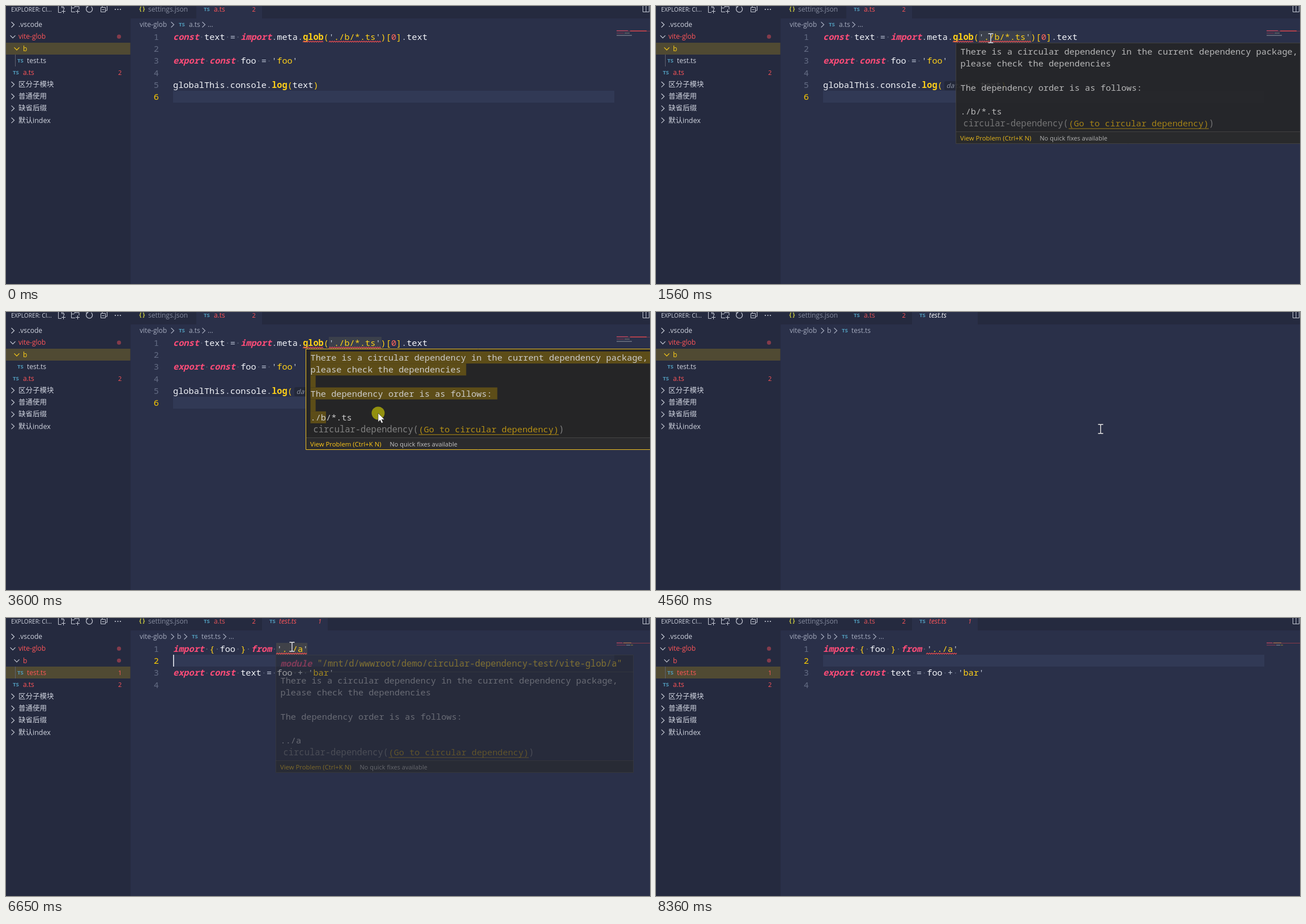
These frames come from a looping animation (1137x492 px, 8430 ms). An HTML page with a canvas:

```html
<!DOCTYPE html>
<html lang="en">
<head>
<meta charset="utf-8">
<title>Circular dependency hints</title>
<style>
html, body { margin: 0; width: 100%; height: 100%; overflow: hidden; background: #2a3049; }
canvas { display: block; }
</style>
</head>
<body>
<canvas id="stage" width="1137" height="492"></canvas>
<script>
const ctx = document.getElementById('stage').getContext('2d');
const LOOP = 8430, ROW = 21.17, CELL = 9.165, CODE_X = 295;
const MONO = '"Noto Sans Mono", monospace';
const TEXT_SIZE = 15.27, SNIPPET_SIZE = 15.47;
const SANS = '"Open Sans", "Noto Sans CJK SC", "Noto Sans CJK", sans-serif';
const RED = '#ff5558', YELLOW = '#ffd018', GREY = '#a4aabd', LIGHT = '#d0d4df';

// Moments of the hard changes, in ms.
const T = { hint: 600, hover1: 1490, focus: 2990, press: 3060, clear: 3670, open: 4400,
  reveal: 4650, content: 4780, errors: 5130, caret: 5640, hover2: 6650, leave2: 7480 };

const STYLES = {
  k: ['italic bold ', '#ff4c78'], w: ['', '#f4f6fb'], p: ['', '#c3cbdc'],
  y: ['', YELLOW], b: ['bold ', YELLOW], r: ['', '#ff6659']
};

const MOUSE = [[190, 1085, 500], [330, 1010, 400], [560, 820, 230], [800, 660, 110], [1020, 593, 65],
  [1160, 591, 57], [2090, 591, 57], [2500, 625, 130], [2910, 650, 192], [3060, 566, 187],
  [3350, 537, 74], [3560, 657, 179], [3740, 657, 179], [4150, 785, 207], [4780, 785, 207],
  [5200, 680, 130], [5570, 580, 71], [5710, 573, 68], [6320, 505, 51], [7130, 505, 51],
  [7340, 858.5, 282], [7600, 1010, 390], [7890, 1119, 502]];

function mouseAt(t) {
  const i = MOUSE.findIndex(p => p[0] > t);
  if (i < 1) return null;
  const [t0, x0, y0] = MOUSE[i - 1], [t1, x1, y1] = MOUSE[i];
  const u = (t - t0) / (t1 - t0);
  return [x0 + (x1 - x0) * u, y0 + (y1 - y0) * u];
}

function rect(x, y, w, h, color) {
  ctx.fillStyle = color;
  ctx.fillRect(x, y, w, h);
}

function stroke(path, color, width = 1) {
  ctx.strokeStyle = color;
  ctx.lineWidth = width;
  ctx.stroke(new Path2D(path));
}

function dot(x, y, r, color) {
  ctx.fillStyle = color;
  ctx.beginPath();
  ctx.arc(x, y, r, 0, 7);
  ctx.fill();
}

function text(str, x, y, color, font) {
  ctx.font = font;
  ctx.fillStyle = color;
  ctx.fillText(str, x, y);
}

const ui = (str, x, y, color = LIGHT, size = 12, style = '') =>
  text(str, x, y + 4.3, color, `${style} ${size}px ${SANS}`);

const mono = (str, x, y, color = '#cccccc', style = '', size = TEXT_SIZE) =>
  text(str, x, y + 5, color, `${style} ${size}px ${MONO}`);

// Draws [style, text] pairs on the character grid, with dots for spaces.
function code(x, y, runs) {
  for (const [key, str] of runs) {
    const [style, color] = STYLES[key];
    mono(str, x, y, color, style);
    [...str].forEach((c, i) => {
      if (c === ' ') dot(x + (i + .5) * CELL, y, .95, '#5e667e');
    });
    x += str.length * CELL;
  }
}

function squiggle(x0, x1, y) {
  let path = `M${x0} ${y}`;
  for (let x = x0 + 2, up = true; x <= x1; x += 2, up = !up) path += `L${x} ${y + (up ? -2 : 0)}`;
  stroke(path, '#f04d50', 1.1);
}

function chevron(x, y, down, color = '#c6cad5') {
  stroke(down ? `M${x - 4.5} ${y - 2}l4.5 4.5l4.5 -4.5` : `M${x - 2.5} ${y - 4.8}l5 4.8l-5 4.8`, color, 1.2);
}

const tsIcon = (x, y) => text('TS', x, y + 3.3, '#519aba', `bold 9.6px ${SANS}`);

function sidebar(t) {
  rect(0, 0, 220, 492, '#252a3f');
  ui('EXPLORER: CI...', 9, 6, LIGHT, 10.2);
  const icon = '#c6cad5';
  stroke('M98 11.5H92.500V-1H99L102.500 3V6M98.500 -1V3H102M98 9.500H105M101.500 6V13', icon);
  stroke('M122 10.500H115.500V-1H120L122 1H129V6M115.500 3.500H120L122 1M123 9.500H130M126.500 6V13', icon);
  stroke('M144 1A5.500 5.500 0 1 0 150.500 1.200M144.500 -2V1.500H141', icon, 1.2);
  stroke('M167.500 2.500H175.500V10.500H167.500ZM170 2V-.5H178.500V8H176M169.500 6.500H173.500', icon);
  [193, 197.5, 202].forEach(x => dot(x, 6, 1.1, icon));

  const errors = t >= T.errors, moved = t >= T.reveal;
  const y = i => 33 + i * ROW;
  rect(0, moved ? 86 : 65, 219.5, 21, '#504a33');
  if (t < T.focus || moved) rect(16, 86, 1, 21, '#5f6270');

  chevron(12, y(0));
  ui('.vscode', 22, y(0));
  chevron(12, y(1), true);
  ui('vite-glob', 22, y(1), RED);
  dot(199.5, y(1), 3.6, '#843b4b');
  const folder = errors ? RED : moved ? LIGHT : YELLOW;
  chevron(19, y(2), true, moved ? icon : YELLOW);
  ui('b', 30, y(2), folder);
  if (errors) dot(199.5, y(2), 3.6, '#843b4b');
  tsIcon(20, y(3));
  ui('test.ts', 37, y(3), errors ? RED : moved ? YELLOW : LIGHT);
  if (errors) ui('1', 198, y(3), RED, 11);
  tsIcon(12, y(4));
  ui('a.ts', 30, y(4), RED);
  ui('2', 198, y(4), RED, 11);
  ['区分子模块', '普通使用', '缺省后缀', '默认index'].forEach((name, i) => {
    chevron(12, y(5 + i));
    ui(name, 22, y(5 + i), LIGHT, 12.5);
  });
}

function tabs(t, opened) {
  rect(220, 0, 917, 22, '#252a3f');
  rect(opened ? 452 : 336, 0, 116, 22, '#2a3049');
  text('{}', 234, 9, '#cbcb41', `bold 10.5px ${MONO}`);
  ui('settings.json', 251, 6, '#858b9e');
  tsIcon(349, 6);
  ui('a.ts', 367, 6, opened ? '#e15459' : RED);
  ui('2', 434.5, 6, RED, 11);
  if (opened) {
    const errors = t >= T.errors;
    tsIcon(465, 6);
    ui('test.ts', 482, 6, errors ? RED : '#ffffff', 12, 'italic');
    if (errors) ui('1', 551, 6, RED, 11, 'italic');
  }
  stroke('M1124.500 -1H1135.500V10.500H1124.500ZM1130 -1V10.500', '#c6cad5');

  ui('vite-glob', 236, 33, GREY);
  chevron(294, 33, false, GREY);
  let x = 305;
  if (opened) {
    ui('b', x - 3, 33, GREY);
    chevron(317, 33, false, GREY);
    x = 328;
  }
  tsIcon(x, 33);
  ui(opened ? 'test.ts' : 'a.ts', x + (opened ? 17 : 18), 33, GREY);
  if (!opened || t >= T.content) {
    chevron(opened ? 386 : 349, 33, false, GREY);
    ui('...', opened ? 393 : 356, 33, GREY);
  }
}

const lineY = n => 55 + (n - 1) * ROW;

function lineNumbers(count, active) {
  ctx.textAlign = 'right';
  for (let n = 1; n <= count; n++) mono(n, 270, lineY(n), n === active ? '#ffcc00' : '#646c84');
  ctx.textAlign = 'left';
}

function firstFile(t) {
  rect(295, 150, 779, 21, '#313955');
  lineNumbers(6, 6);
  if (t >= T.hover1) rect(570, 44, 93, 21, '#3b404b');
  code(CODE_X, lineY(1), [['k', 'const'], ['w', ' text '], ['p', '= '], ['k', 'import'], ['p', '.'],
    ['w', 'meta'], ['p', '.'], ['b', 'glob'], ['y', '('], ['p', "'"], ['y', './b/*.ts'], ['p', "'"],
    ['y', ')['], ['r', '0'], ['y', ']'], ['p', '.'], ['w', 'text']]);
  squiggle(524, 561, 64);
  squiggle(570, 663, 64);
  code(CODE_X, lineY(3), [['k', 'export const'], ['w', ' foo '], ['p', "= '"], ['y', 'foo'], ['p', "'"]]);
  code(CODE_X, lineY(5), [['w', 'globalThis'], ['p', '.'], ['w', 'console'], ['p', '.'], ['b', 'log'], ['y', '(']]);
  const hint = t >= T.hint;
  if (hint) {
    ctx.fillStyle = '#232839';
    ctx.beginPath();
    ctx.roundRect(509, 133, 61, 16, 3);
    ctx.fill();
    text('data[0]:', 512.5, 145, '#8b91a1', `italic 11.7px ${MONO}`);
  }
  code(hint ? 572.5 : CODE_X + 23 * CELL, lineY(5), [['w', 'text'], ['y', ')']]);
  rect(1078, 44, 59, 1, '#76394c');
  rect(1078, 43, 20, 1.2, '#b04560');
  rect(1102, 43.5, 29, 1.5, '#d9464e');
  rect(1078, 47.5, 13, 1, '#8a3d59');
  rect(1092, 47.5, 9, 1, '#85847f');
  rect(1078, 51.5, 27, 1, '#90969f');
}

function secondFile(t) {
  rect(295, 65, 779, 21, '#313955');
  lineNumbers(4, t >= T.caret ? 2 : 0);
  if (t >= T.hover2 && t < T.leave2) rect(477, 44, 55, 21, '#404249');
  code(CODE_X, lineY(1), [['k', 'import'], ['y', ' { '], ['w', 'foo'], ['y', ' } '], ['k', 'from'],
    ['p', " '"], ['y', '../a'], ['p', "'"]]);
  if (t >= T.errors) squiggle(477, 532, 64);
  code(CODE_X, lineY(3), [['k', 'export const'], ['w', ' text '], ['p', '= '], ['w', 'foo '],
    ['p', "+ '"], ['y', 'bar'], ['p', "'"]]);
  if (t >= T.caret && Math.floor((t - T.caret) / 500) % 2 === 0) rect(295, 65, 1.6, 21, '#e8ebf3');
  if (t >= T.errors) rect(1078, 44, 59, 1, '#8a3a49');
  rect(1078, 43.5, 10, 1.2, '#b54763');
  rect(1090, 43.5, 14, 1.2, '#b0784f');
  rect(1078, 47.5, 16, 1, '#8f3d5b');
  rect(1095, 47.5, 7, 1, '#8f949e');
  rect(1103, 47.5, 4, 1, '#94823b');
}

function popup(x, w, messageY, path, border, selectedFrom) {
  const tx = x + 8.5, bottom = messageY + 163;
  const lines = ['There is a circular dependency in the current dependency package,',
    'please check the dependencies', '', 'The dependency order is as follows:', '', path];
  rect(x, 65, w, bottom - 65, '#252526');
  rect(x, bottom - 22, w, 22, '#2b2b2d');
  rect(x, bottom - 22, w, 1, '#454545');
  lines.forEach((line, i) => {
    const y = messageY + i * ROW;
    if (y + 11 > selectedFrom) {
      rect(tx, y - 11, (i === 5 ? 3 : line.length + 1) * CELL, ROW, '#5d4d18');
    }
    mono(line, tx, y);
  });
  const y = messageY + 6 * ROW;
  mono('circular-dependency(', tx + 5, y, '#808080', '', SNIPPET_SIZE);
  mono('(Go to circular dependency)', tx + 191, y, '#b69014');
  rect(tx + 191, y + 8.5, 27 * CELL, 1, '#b69014');
  mono(')', tx + 191 + 27 * CELL, y, '#808080', '', SNIPPET_SIZE);
  ui('View Problem (Ctrl+K N)', tx - .5, bottom - 10.5, '#ffc818', 11.35);
  ui('No quick fixes available', tx + 140, bottom - 10.5, '#c4c4c4', 11);
  stroke(`M${x + .5} 65.500h${w - 1}V${bottom - .5}h${1 - w}Z`, border);
}

const fade = age => age < 70 ? .4 : age < 140 ? .88 : 1;

function popups(t, mouse) {
  if (t >= T.hover1 && t < T.open) {
    ctx.globalAlpha = fade(t - T.hover1);
    const selecting = t >= T.press && t < T.clear;
    const from = !selecting ? Infinity : t > 3350 ? 0 : mouse[1];
    popup(529, 640, 81, './b/*.ts', t >= T.focus ? '#f0c020' : '#454545', from);
  } else if (t >= T.hover2 && t < T.leave2) {
    ctx.globalAlpha = fade(t - T.hover2);
    popup(476, 632, 111, '../a', '#4a4a4a', Infinity);
    rect(477, 95, 631, 1, '#454545');
    mono('module', 484.5, 81, '#ff4c78', 'italic bold', SNIPPET_SIZE);
    mono('"/mnt/d/wwwroot/demo/circular-dependency-test/vite-glob/a"',
      484.5 + 7 * .6 * SNIPPET_SIZE, 81, YELLOW, '', SNIPPET_SIZE);
  }
  ctx.globalAlpha = 1;
}

function pointer(t, [x, y]) {
  const pressed = t >= T.press && t < 3350 || t >= 3560 && t < 3740 || t >= 4220 && t < 4360;
  if (pressed) dot(x, y, 11.5, '#92900f');
  if (t > 2200 && t < T.open) {
    const arrow = new Path2D(`M${x} ${y}v15.500l3.600 -3.300l2.400 5.400l2.600 -1.100l-2.400 -5.300h4.900Z`);
    ctx.fillStyle = '#ffffff';
    ctx.fill(arrow);
    ctx.strokeStyle = '#222222';
    ctx.lineWidth = .6;
    ctx.stroke(arrow);
  } else {
    const beam = `M${x - 4.5} ${y - 8}h3.500l1 1l1 -1h3.500M${x} ${y - 7}v14M${x - 4.5} ${y + 8}h3.500l1 -1l1 1h3.500`;
    stroke(beam, '#20243a', 2.6);
    stroke(beam, '#f2f2f2', 1.4);
  }
}

function draw() {
  const t = performance.now() % LOOP, opened = t >= T.open, mouse = mouseAt(t);
  rect(0, 0, 1137, 492, '#2a3049');
  tabs(t, opened);
  sidebar(t);
  if (!opened) firstFile(t);
  else if (t >= T.content) secondFile(t);
  popups(t, mouse);
  if (mouse) pointer(t, mouse);
  requestAnimationFrame(draw);
}
draw();
</script>
</body>
</html>
```
